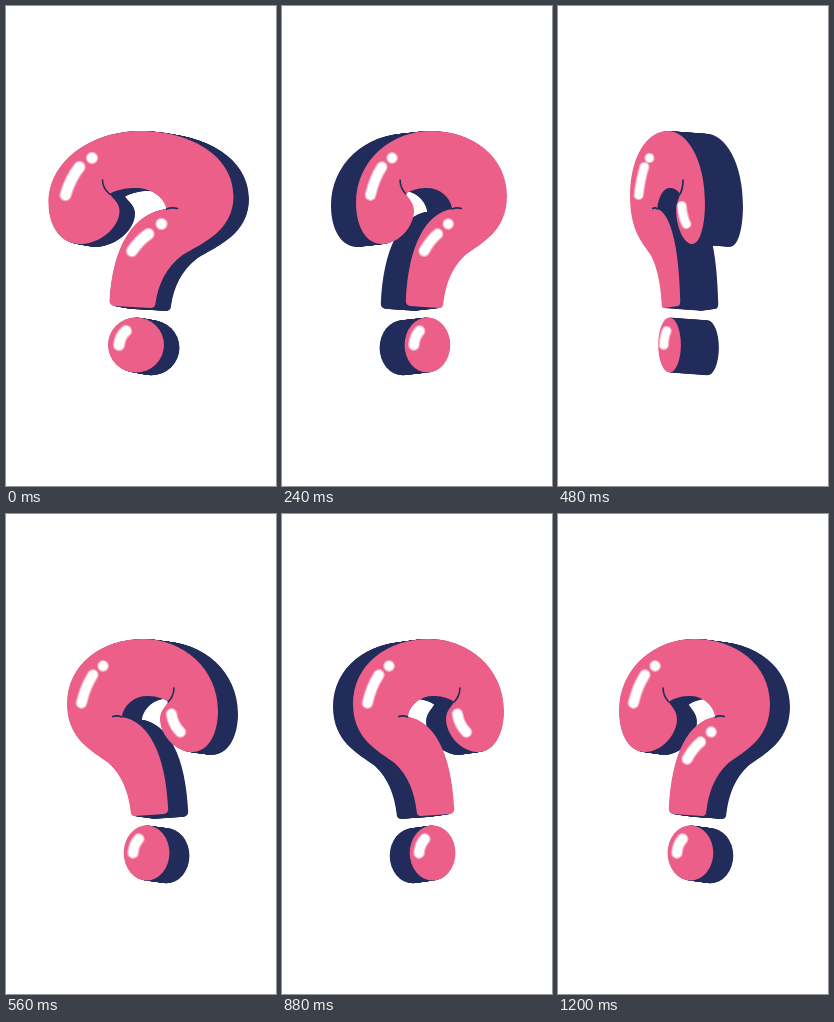
Write an HTML page that moves like this. It is 270 px wide and 480 px high and loops after 1.28 s.

```html
<!DOCTYPE html>
<html lang="en">
<head>
<meta charset="utf-8">
<title>Spinning question mark</title>
<style>
  html, body { margin: 0; width: 100%; height: 100%; overflow: hidden; background: #fff; }
  svg { display: block; width: 100%; height: 100%; }
  .navy { fill: #212c5b; }
  .pink { fill: #eb5f88; }
  .crease { fill: none; stroke: #212c5b; stroke-width: 1.6; stroke-linecap: round; vector-effect: non-scaling-stroke; }
  .shine { fill: none; stroke: #fff; stroke-linecap: round; }
  .glow { fill: none; stroke: #fbc3d8; stroke-linecap: round; opacity: .75; }
</style>
</head>
<body>
<svg viewBox="0 0 270 480">
  <defs>
    <g id="mark">
      <path d="M104 188C112 183 122 182 130 182C145 182 158 190 161 203C128 207 107 240 104 295
        Q104 299 109 300L145 302Q150 302 150 297C153 278 160 262 177 249C197 237 228 225 228 190
        C228 150 185 125 135.500 125C85 125 43 155 43 197C43 222 57 239 76 238
        C97 237 114 220 114 205C114 197 108 193 104 188Z"/>
      <ellipse cx="130.500" cy="339" rx="28" ry="27.500"/>
    </g>
  </defs>
  <g id="solid">
    <g id="side" class="navy"></g>
    <g id="face">
      <use href="#mark" class="pink"/>
      <path class="crease" d="M97 174Q97 182 104 188M172 202.500Q166 201 161 203"/>
    </g>
    <path id="glow" class="glow"/>
    <path id="shine" class="shine"/>
  </g>
  <g id="edge" class="navy">
    <path d="M104 135Q104 131 108 129Q124 122 150 126Q153.500 127 153.500 131V294Q153.500 299 148 299H109Q104 299 104 294Z"/>
    <rect x="103.500" y="309" width="49.500" height="54.500" rx="6"/>
  </g>
</svg>
<script>
const STEP = 80, MID = 135.5, HALF = 92.5, LAYERS = 32, DROP = 2.8;

// Face centre, signed width (negative = seen from behind), depth offset; null = edge-on
const poses = [
  [135, 1, 15.5], [143, .973, 0], [146, .92, -12], [149.5, .816, -25],
  [149, .5, -38], null, [109.5, -.405, 38], [136.5, -.816, 20],
  [135.5, -1, 15], [143, -.973, 0], [145, -.92, -11], [146.5, -.816, -20],
  [148, -.5, -38], null, [109.5, .405, 38], [136.5, .816, 20]
];

const el = id => document.getElementById(id);
const side = el('side');
const layers = Array.from({ length: LAYERS }, () => {
  const use = document.createElementNS('http://www.w3.org/2000/svg', 'use');
  use.setAttribute('href', '#mark');
  return side.appendChild(use);
});

function place(node, centre, scale, y = 0) {
  node.setAttribute('transform', `translate(${centre} ${y}) scale(${scale} 1) translate(${-MID} 0)`);
}

function highlights(centre, scale) {
  const width = Math.abs(scale);
  const onFace = u => centre + scale * (u - MID);
  const fromLeft = v => centre - width * HALF + 3 + width * v;
  const onBall = v => onFace(130.5) + 2 + width * v;
  const streak = (map, a, ay, b, by, c, cy) => `M${map(a)} ${ay}Q${map(b)} ${by} ${map(c)} ${cy}`;
  const dot = (map, a, y) => `M${map(a)} ${y}h.01`;

  const lower = scale > 0
    ? streak(onFace, 143, 228, 134, 234, 126.5, 245) + dot(onFace, 156, 218)
    : streak(onFace, 100, 200, 98, 211, 89, 218);
  return streak(fromLeft, 28, 161, 19, 172, 14, 189) + dot(fromLeft, 40.5, 152)
    + lower + streak(onBall, -12, 325, -18, 330, -19, 339);
}

function draw(step) {
  const pose = poses[step];
  el('solid').style.display = pose ? '' : 'none';
  el('edge').style.display = pose ? 'none' : '';
  if (!pose) return;

  const [centre, scale, depth] = pose;
  side.style.display = depth ? '' : 'none';
  layers.forEach((layer, i) => {
    const back = (i + 1) / LAYERS;
    place(layer, centre + depth * back, scale, DROP * back);
  });
  place(el('face'), centre, scale);

  const d = highlights(centre, scale);
  const width = 6.5 + 3.5 * Math.abs(scale);
  el('shine').setAttribute('d', d);
  el('shine').setAttribute('stroke-width', width);
  el('glow').setAttribute('d', d);
  el('glow').setAttribute('stroke-width', width + 2.5);
}

let start = null, shown = -1;
function tick(now) {
  if (start === null) start = now;
  const step = Math.floor((now - start) / STEP) % poses.length;
  if (step !== shown) draw(shown = step);
  requestAnimationFrame(tick);
}
draw(0);
requestAnimationFrame(tick);
</script>
</body>
</html>
```
